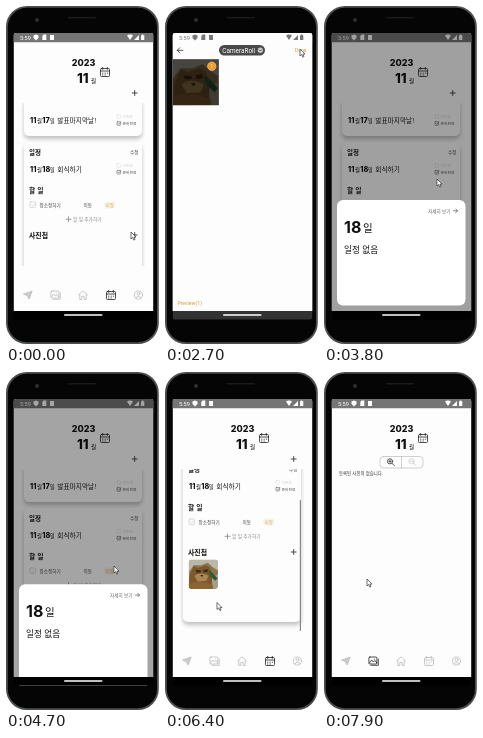
An HTML page for the animation above (8000 ms loop, 153x338 px).

```html
<!DOCTYPE html>
<html lang="ko">
<head>
<meta charset="utf-8">
<style>
  html, body { margin: 0; width: 100%; height: 100%; overflow: hidden; background: #fff; }
  svg { display: block; width: 100vw; height: 100vh; }
  text { font-family: "Noto Sans CJK KR", "Noto Sans CJK", "Noto Sans KR", sans-serif; fill: #111; }
  .latin { font-family: Roboto, sans-serif; }
  .digits { font-family: Inter, sans-serif; font-weight: 800; }
  .b { font-weight: 700; }
  .m { font-weight: 500; }
  .line { fill: none; stroke: currentColor; stroke-width: .8; stroke-linecap: round; stroke-linejoin: round; }
  .card { fill: #fdfdfd; filter: drop-shadow(0 3px 2px rgba(0, 0, 0, .24)); }
</style>
</head>
<body>
<svg viewBox="0 0 153 338">
  <defs>
    <clipPath id="screen"><rect x="7.8" y="27" width="139.4" height="286.4" rx="2"/></clipPath>
    <clipPath id="list"><path d="M15 97H139V260H15z"/></clipPath>
    <clipPath id="round"><rect x="23.6" y="236.6" width="29.4" height="29.5" rx="4"/></clipPath>

    <symbol id="photo" viewBox="0 0 46 46" preserveAspectRatio="none">
      <path fill="#8c7650" d="M0 0H46V46H0z"/>
      <path fill="#bab6a8" d="M0 0H46V17L38 12 30 5 20 9 8 9 0 20z"/>
      <path fill="#a39d8c" d="M36 30L46 22V46H38z"/>
      <path fill="#7c582c" d="M2 24L8 10 15 13 27 9 33 12 37 26 36 40 20 46H0z"/>
      <path fill="#a98653" d="M9 25Q19 18 31 25L28 33 14 34z"/>
      <path fill="#3a2a17" d="M11 16l8 1v3l-7 0zM23 16l7-1v4l-6 1zM18 24h5l-2 3z"/>
      <path fill="#8d6331" d="M0 38Q18 31 38 40V46H0z"/>
      <path fill="#2f5a30" d="M31 17L35 18 45 29 42 33 34 26z"/>
    </symbol>

    <g id="status">
      <text class="latin" x="14" y="33.7" font-size="5.6" style="fill:currentColor">5:59</text>
      <g fill="currentColor">
        <path d="M27.5 29.5L30 28.5 32.5 29.5V32L30 34.5 27.5 32z"/>
        <path d="M36.3 30l1.2-1.5H40.3V34H36.3z"/>
        <path d="M44 29h4v5h-4z"/>
        <path d="M121 29.6Q124 27.4 127 29.6L124 34z"/>
        <path d="M128 34L133 29V34z"/>
        <path d="M135 29.3h1V28.5h1.3v.8h1V34H135z"/>
      </g>
    </g>

    <g id="calendar" class="line">
      <rect x="-4.5" y="-3.7" width="9" height="8" rx="1"/>
      <path d="M-4.5-1.2H4.5M-2.3-4.8v2M2.3-4.8v2M-2.5 1h.4M0 1h.4M2.3 1h.4M-2.5 2.8h.4M0 2.8h.4"/>
    </g>
    <g id="gallery" class="line">
      <rect x="-4.6" y="-4" width="8" height="7" rx="1"/>
      <path d="M-4 2L-1.8-1 0 1 1.5-.5 3.4 2M4.8-2V4.3H-2.6M1-2h.2"/>
    </g>
    <path id="plus" class="line" d="M-2.5 0H2.5M0-2.5V2.5"/>
    <g id="checks">
      <g color="#ddd"><rect class="line" x="111" y="-5.6" width="3.6" height="3.6" rx=".6" style="stroke-width:.6"/>
        <text x="116.5" y="-2.2" font-size="3.8" style="fill:#d4d4d4">미완료</text></g>
      <g color="#666"><rect class="line" x="111" y="1.2" width="3.6" height="3.6" rx=".6" style="stroke-width:.6"/>
        <path class="line" d="M112 3l.8.9 2-2.6" style="stroke-width:.6"/>
        <text x="116.5" y="4.6" font-size="3.8" style="fill:#555">준비완료</text></g>
    </g>
  </defs>

  <!-- phone -->
  <rect x=".9" y=".9" width="151" height="336.2" rx="20" fill="#050505" stroke="#4c4f51" stroke-width="1.8"/>
  <rect x="62" y="11" width="28" height="1.5" rx=".7" fill="#191b1c"/>
  <circle cx="31" cy="14" r="2" fill="#2b3036"/>

  <g clip-path="url(#screen)">
    <path fill="#fdfdfd" d="M7 27H148V305H7z"/>
    <path fill="#757575" d="M7 27H148V36.3H7z"/>
    <use href="#status" color="#fff"/>

    <text class="digits" x="77.5" y="59.7" font-size="9" text-anchor="middle">2023</text>
    <text class="digits" x="71" y="77.4" font-size="13.2">11</text>
    <text x="85" y="77" font-size="5.6">월</text>
    <use href="#calendar" x="99" y="66.2" color="#222"/>

    <g id="month">
      <use href="#plus" x="128.7" y="87" color="#222"/>
      <g clip-path="url(#list)">
        <g id="scroll">
          <rect class="card" x="18" y="92" width="118" height="38" rx="5"/>
          <g id="dates"></g>
          <rect id="sheet" class="card" x="18" y="136" width="118" rx="5"/>
          <text class="b" x="23" y="148.6" font-size="6.5">일정</text>
          <text x="124" y="147.6" font-size="4.6" style="fill:#444">수정</text>
          <g id="meeting"></g>
          <text class="b" x="23" y="186.6" font-size="6.8">할 일</text>
          <g color="#ccc"><rect class="line" x="24" y="196" width="5.6" height="5.6" rx="1" style="stroke-width:.7"/>
            <path class="line" d="M25.5 199l1.3 1.3 2-2.6" style="stroke-width:.6"/></g>
          <text x="33.5" y="200.8" font-size="4.6" style="fill:#444">장소정하기</text>
          <text x="77.5" y="200.8" font-size="4.6" style="fill:#444">이동</text>
          <rect x="98" y="195.5" width="11.5" height="7" rx="2" fill="#f8f4ea"/>
          <text x="99.8" y="200.7" font-size="4.3" style="fill:#d3ac68">미정</text>
          <use href="#plus" x="62.5" y="213.3" color="#888"/>
          <text x="67" y="215.2" font-size="4.7" style="fill:#888">할 일 추가하기</text>
          <text class="b" x="23" y="232.4" font-size="6.9">사진첩</text>
          <use id="add" href="#plus" x="128.7" y="229" color="#222"/>
          <g id="thumb" clip-path="url(#round)"><use href="#photo" x="23.6" y="236.6" width="29.4" height="29.5"/></g>
        </g>
        <rect id="bar" x="134.8" y="128" width="1.2" height="131" fill="#888"/>
      </g>
    </g>

    <g id="album">
      <g class="line" color="#bbb" style="stroke-width:.7"><rect x="56" y="84.5" width="43" height="11.5" rx="3.5"/><path d="M77.5 84.5V96"/></g>
      <g class="line" color="#333"><circle cx="66" cy="89.3" r="2.6"/><path d="M68 91.3l2.4 2.4M64.8 89.3h2.4M66 88.1v2.4"/></g>
      <g class="line" color="#ccc"><circle cx="87.5" cy="89.3" r="2.6"/><path d="M89.5 91.3l2.4 2.4M86.3 89.3h2.4"/></g>
      <text x="15" y="103" font-size="4.4" style="fill:#333">등록된 사진이 없습니다.</text>
    </g>

    <g color="#bbb">
      <path class="line" d="M17.8 288L26.2 285 23.2 293 21.3 289.8z" style="fill:#ccc"/>
      <use id="tabAlbum" href="#gallery" x="49.5" y="289"/>
      <path class="line" d="M72.5 289L77 284.8 81.5 289M73.8 288.5V293.5H75.8V290.3H78.2V293.5H80.2V288.5"/>
      <use id="tabMonth" href="#calendar" x="105" y="289.2"/>
      <g class="line"><circle cx="132.5" cy="289" r="4.1"/><circle cx="132.5" cy="287.8" r="1.5"/><path d="M129.8 292Q132.5 288.5 135.2 292"/></g>
    </g>

    <path id="dim" d="M7 27H148V305H7z"/>
    <g id="modal">
      <rect x="13" y="194" width="128.5" height="105.5" rx="6" fill="#fff"/>
      <text x="104" y="206.6" font-size="4.6" style="fill:#666">자세히 보기</text>
      <path class="line" color="#555" d="M129.5 204.8h4M131.8 203l1.8 1.8-1.8 1.8" style="stroke-width:.7"/>
      <text class="digits" x="20" y="226.5" font-size="16" style="font-weight:700">18</text>
      <text class="m" x="39" y="226" font-size="10.5">일</text>
      <text class="m" x="20" y="246.8" font-size="8.6">일정 없음</text>
    </g>
    <path fill="#000" d="M7 305H148V314H7z"/>

    <g id="picker">
      <path fill="#fdfdfd" d="M7 27H148V305H7z"/>
      <path fill="#333" d="M7 305H148V314H7z"/>
      <use href="#status" color="#777"/>
      <path class="line" color="#333" d="M18 44.3H12.3M14.8 41.8L12.3 44.3 14.8 46.8"/>
      <rect x="54" y="39" width="46" height="10.5" rx="5.2" fill="#4a4a4a"/>
      <text class="latin" x="57.3" y="46.6" font-size="6.4" style="fill:#fff">CameraRoll</text>
      <circle cx="95.3" cy="44.2" r="2.6" fill="#ccc"/>
      <path class="line" color="#444" d="M94 43.7l1.3 1.3 1.3-1.3"/>
      <text id="done" class="latin" x="129.8" y="46.2" font-size="5.1">Done</text>
      <use href="#photo" x="7.5" y="53.3" width="46.3" height="46"/>
      <g id="picked">
        <path d="M7 53.3H53.8V99.3H7z" opacity=".62"/>
        <circle cx="46.8" cy="60.3" r="4.2" fill="#f09a20" stroke="#f7d6a4" stroke-width=".6"/>
        <text class="latin" x="46.8" y="62" font-size="4.6" text-anchor="middle" style="fill:#fff">1</text>
      </g>
      <text id="preview" class="latin" x="12.4" y="298.8" font-size="5.2"></text>
    </g>
    <rect x="58" y="308.2" width="38.5" height="1.6" rx=".8" fill="#fff"/>
    <path id="cursor" d="M0 0V7L1.7 5.5 2.8 8.1 4 7.5 2.9 5.1H5z" fill="#fff" stroke="#333" stroke-width=".7" stroke-linejoin="round"/>
  </g>
</svg>
<script>
const $ = id => document.getElementById(id);

function dateRow(id, day, title, y) {
  $(id).innerHTML = `
    <g font-size="7.2"><text class="digits" x="24" y="${y + 2.6}">11</text>
      <text class="digits" x="36.3" y="${y + 2.6}">${day}</text></g>
    <g font-size="5.4"><text class="m" x="31" y="${y + 2.4}">월</text><text class="m" x="43.8" y="${y + 2.4}">일</text></g>
    <text class="m" x="51.3" y="${y + 2.6}" font-size="6.7">${title}</text>
    <use href="#checks" y="${y}"/>`;
}
dateRow("dates", 17, "발표마지막날!", 114.5);
dateRow("meeting", 18, "회식하기", 163.2);

// Eased value between [time, value...] stops
function at(t, stops, i = 1) {
  const n = stops.findIndex(s => s[0] > t);
  if (n < 0) return stops[stops.length - 1][i];
  if (n === 0) return stops[0][i];
  const a = stops[n - 1], b = stops[n];
  const p = (t - a[0]) / (b[0] - a[0]);
  return a[i] + (b[i] - a[i]) * p * p * (3 - 2 * p);
}

const path = [
  [500, 125, 226], [1300, 58, 72], [1500, 51.7, 65], [1700, 49, 61], [1900, 49, 61],
  [2700, 135, 43], [3100, 135, 43], [3800, 113, 173], [3900, 112, 183], [4400, 108, 194],
  [5100, 108, 194], [5500, 101, 197], [5900, 52, 230.5], [6400, 52, 230.5], [7200, 43, 207]
];
const pickerY = [[400, 287], [900, 0], [3000, 0], [3400, 287]];
const modalY = [[3400, 115], [3800, 0], [4600, 0], [5000, 115]];
const dim = [[3400, 0], [3800, .37], [4600, .37], [5100, .21], [5500, 0]];
const offset = [[6300, 0], [6400, 49], [6900, 49], [7500, 47]];
const bar = [[6300, 0], [6400, 1], [6900, 1], [7500, 0]];

const move = (id, x, y) => $(id).setAttribute("transform", `translate(${x} ${y})`);
const show = (id, on) => $(id).style.display = on ? "" : "none";

function draw(t) {
  const picked = t >= 1900, hasPhoto = t >= 3100, album = t >= 7900;
  move("cursor", at(t, path), at(t, path, 2));
  move("picker", 0, at(t, pickerY));
  move("modal", 0, at(t, modalY));
  move("scroll", 0, -at(t, offset));
  show("picker", t > 400 && t < 3400);
  show("modal", t > 3400 && t < 5000);
  show("picked", picked);
  show("thumb", hasPhoto);
  show("month", !album);
  show("album", album);
  $("dim").style.opacity = at(t, dim);
  $("bar").style.opacity = at(t, bar);
  $("add").style.opacity = t >= 100 && t < 200 ? .4 : 1;
  $("thumb").style.opacity = t >= 7700 ? .5 : 1;
  $("sheet").setAttribute("height", hasPhoto ? 163 : 132);
  $("done").style.fill = $("preview").style.fill = picked ? "#dd9a30" : "#999";
  $("preview").textContent = picked ? "Preview(1)" : "Preview";
  $("tabAlbum").style.color = album ? "#222" : "";
  $("tabMonth").style.color = album ? "" : "#222";
}

const start = performance.now();
(function tick() {
  draw((performance.now() - start) % 8000);
  requestAnimationFrame(tick);
})();
</script>
</body>
</html>
```
